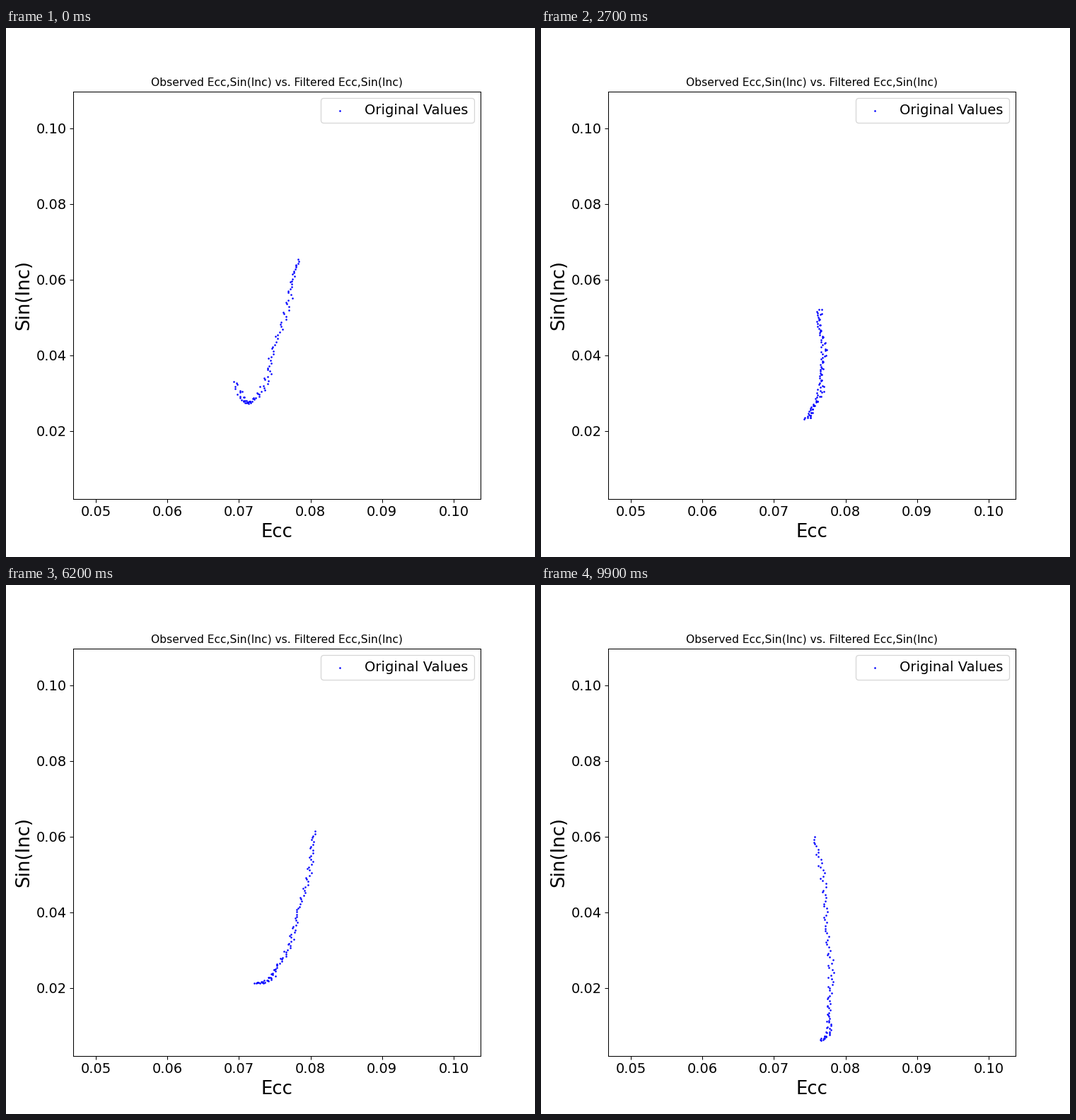
These frames come from a looping animation (748 by 748 pixels, 10000 ms). A matplotlib script:

```python
import numpy as np
import matplotlib.pyplot as plt
from matplotlib.animation import FuncAnimation

SIZE, DPI = 748, 93.5
FRAMES, POINTS = 100, 100
XLIM, YLIM = (0.04688, 0.10380), (0.00202, 0.10968)
LEFT, BOTTOM, SIDE = 95.4, 665.7, 576.0  # plot box in stage pixels
TAU = 2 * np.pi


def orbit(t):
    """Stage position: shared slow drift plus one free oscillation per axis."""
    drift = np.cos(TAU * (t - 56) / 66)
    x = 339 + 28 * drift + 85 * np.cos(1.221 * t - 1.97)
    swing = 144 + 52 * np.cos(TAU * (t - 11) / 29)
    surge = 1.76 * t * np.exp(-t / 3.3)
    y = 435 - 23 * drift + swing * np.cos(2.039 * (t - 0.37) + surge)
    return x, y


def wobble(k):
    """Short-period scatter around the mean path."""
    rng = np.random.default_rng(k)
    n = np.arange(POINTS)
    zigzag = TAU * n / 4.6 + k
    amp = 2.6 + 1.2 * np.sin(n / 5.3 + k)
    dx = amp * np.sin(zigzag) + 2 * np.sin(TAU * n / 33 + k)
    return dx + rng.normal(0, 0.9, POINTS), 0.9 * np.cos(zigzag)


def to_data(px, py):
    x = XLIM[0] + (px - LEFT) / SIDE * np.ptp(XLIM)
    y = YLIM[0] + (BOTTOM - py) / SIDE * np.ptp(YLIM)
    return np.column_stack([x, y])


def leg(k):
    x, y = orbit(k + np.arange(POINTS) / POINTS)
    dx, dy = wobble(k)
    return to_data(x + dx, y + dy)


fig, ax = plt.subplots(figsize=(SIZE / DPI, SIZE / DPI), dpi=DPI)
ax.set_box_aspect(1)
ax.set(xlim=XLIM, ylim=YLIM)
ax.set_xticks(np.arange(0.05, 0.101, 0.01))
ax.set_yticks(np.arange(0.02, 0.101, 0.02))
ax.xaxis.set_major_formatter("{x:.2f}")
ax.yaxis.set_major_formatter("{x:.2f}")
ax.tick_params(labelsize=15)
ax.set_xlabel("Ecc", fontsize=20, labelpad=4.5)
ax.set_ylabel("Sin(Inc)", fontsize=20, labelpad=3.4)
ax.set_title("Observed Ecc,Sin(Inc) vs. Filtered Ecc,Sin(Inc)", fontsize=11.9)
dots = ax.scatter(*leg(0).T, s=1, color="blue", label="Original Values")
ax.legend(loc="upper right", fontsize=15)


def update(k):
    dots.set_offsets(leg(k))
    return dots,


anim = FuncAnimation(fig, update, frames=FRAMES, interval=100,
                     repeat=True, repeat_delay=0)
plt.show()
```
